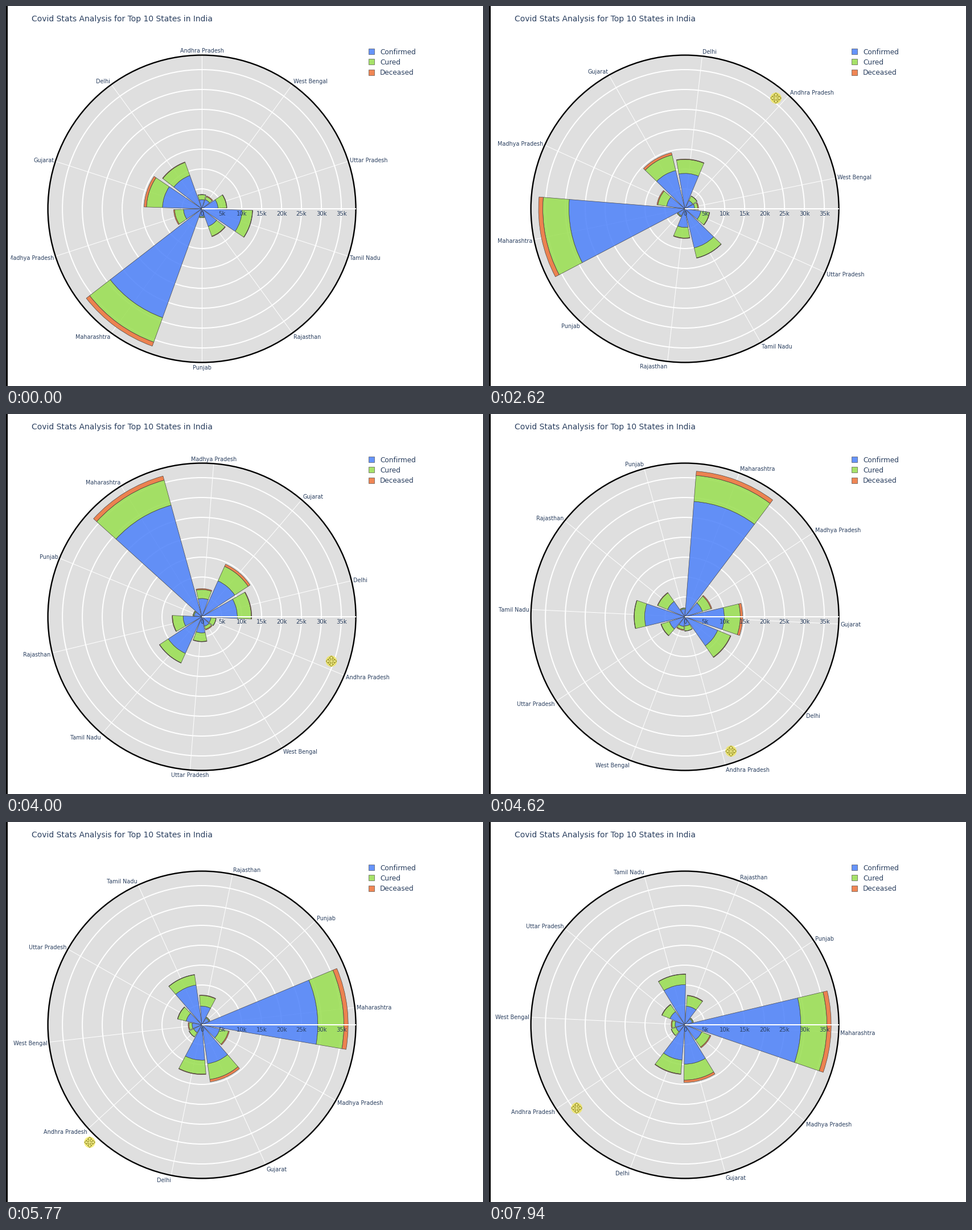
A matplotlib script that plays this animation: 838x669 px, repeating every 8 s.

```python
import numpy as np
import matplotlib.pyplot as plt
from matplotlib.animation import FuncAnimation
from matplotlib.patches import Circle, Polygon, Rectangle, Wedge

W, H, DPI = 838, 669, 64
PX = 72 / DPI
LOOP, TICK = 8000, 40
STEP = LOOP / 104          # the picture refreshes about 13 times a second
CX, CY, R = 344.1, H - 357, 270.5
RING = 35                  # pixels per 5k cases
INK = "#2a3f5f"
SERIES = [("Confirmed", "#5184fa"), ("Cured", "#9bdf54"), ("Deceased", "#ee753c")]

# thousands of cases, one entry per series
STATES = {
    "Andhra Pradesh": (2.3, 1.25, 0.05),
    "Delhi": (8.9, 3.5, 0.12),
    "Gujarat": (9.9, 4.0, 0.6),
    "Madhya Pradesh": (4.6, 2.25, 0.24),
    "Maharashtra": (29.1, 6.55, 1.07),
    "Punjab": (1.95, 0.26, 0.03),
    "Rajasthan": (4.7, 2.65, 0.12),
    "Tamil Nadu": (10.1, 2.6, 0.07),
    "Uttar Pradesh": (4.05, 2.15, 0.1),
    "West Bengal": (2.45, 0.8, 0.2),
}
SECTOR = 360 / len(STATES)
BAR = 0.9 * SECTOR

# the drag: time in ms, chart turn in degrees, cursor distance from the centre
ENTER, ARRIVE, GRAB = 70, 840, 1300
DRAG = np.array([
    (GRAB, 0, 275), (1930, 16.8, 283), (2620, 42.65, 252), (4000, 112.4, 240.5),
    (5160, 205.1, 265), (6090, 233, 294), (6460, 234.5, 298),
    (7560, 234.5, 298), (7920, 236.8, 240)])


def smooth(t, v):
    """Monotone cubic through key points, flat at both ends."""
    s = np.diff(v) / np.diff(t)
    m = np.zeros(len(v))
    for i, (a, b) in enumerate(zip(s, s[1:]), 1):
        m[i] = 2 * a * b / (a + b) if a * b > 0 else 0

    def value(x):
        x = np.clip(x, t[0], t[-1])
        i = min(np.searchsorted(t, x, "right") - 1, len(t) - 2)
        h = t[i + 1] - t[i]
        u = (x - t[i]) / h
        return ((1 + 2 * u) * (1 - u) ** 2 * v[i] + u * (1 - u) ** 2 * h * m[i]
                + u * u * (3 - 2 * u) * v[i + 1] + u * u * (u - 1) * h * m[i + 1])
    return value


turn = smooth(DRAG[:, 0], DRAG[:, 1])
reach = smooth(DRAG[:, 0], DRAG[:, 2])

fig = plt.figure(figsize=(W / DPI, H / DPI), dpi=DPI, facecolor="white")
ax = fig.add_axes([0, 0, 1, 1])
ax.set(xlim=(0, W), ylim=(0, H))
ax.axis("off")


def add(patch, z):
    patch.set_zorder(z)
    return ax.add_patch(patch)


def write(x, y, text, size, align="left"):
    """Text whose capitals are centred on height y, measured from the top."""
    return ax.text(x, H - y - 0.365 * size, text, size=size * PX, color=INK,
                   family="DejaVu Sans", ha=align, va="baseline", zorder=8)


def ring(radius, color, width, z):
    add(Circle((CX, CY), radius, fill=False, ec=color, lw=width * PX), z)


def polar(radius, degrees):
    a = np.radians(degrees)
    return np.array([CX + radius * np.cos(a), CY + radius * np.sin(a)])


add(Circle((CX, CY), R, fc="#dfdfdf", ec="none"), 1)
for k in range(1, 8):
    ring(RING * k, "white", 2, 2)
ring(R, "black", 2.4, 4)

spokes = [ax.plot([], [], color="white", lw=PX, zorder=2)[0] for _ in STATES]
labels = [write(0, 0, name, 9.6) for name in STATES]

bars = []
for i, counts in enumerate(STATES.values()):
    radii = np.cumsum(counts) * RING / 5
    for j, (top, count) in enumerate(zip(radii, counts)):
        bar = Wedge((CX, CY), top, 0, BAR, width=count * RING / 5, fc=SERIES[j][1],
                    ec="#3c3c3c", lw=0.7 * PX, alpha=0.88)
        bars.append((i, add(bar, 3 + 0.1 * j)))

ax.plot([CX, CX + R], [CY, CY], color="white", lw=2 * PX, zorder=5,
        solid_capstyle="butt")
for k in range(8):
    write(CX + RING * k, 365.5, f"{5 * k}k" if k else "0", 10.1, "center")

write(45, 22.3, "Covid Stats Analysis for Top 10 States in India", 13.9)
for k, (name, color) in enumerate(SERIES):
    y = 80.2 + 18.2 * k
    add(Rectangle((636.5, H - y - 5), 10, 10, fc=color, ec="#444444",
                  lw=0.7 * PX, alpha=0.88), 6)
    write(657, y, name, 12.1)

# left margin hides labels that run off the chart
add(Rectangle((0, 0), 8, H, fc="white", ec="none"), 9)
add(Rectangle((0, 0), 2.5, H, fc="black", ec="none"), 9)

arm = np.array([(1.3, 1.3), (1.3, 5), (4, 5), (0, 9.2), (-4, 5), (-1.3, 5)])
quarter = np.array([(0, 1), (-1, 0)])
cross = np.vstack([arm @ np.linalg.matrix_power(quarter, k) for k in range(4)])
halo = add(Circle((0, 0), 9.8, fc="#f2e63c", ec="none", alpha=0.65), 10)
arrows = add(Polygon(cross, closed=True, fc="#f3ee8c", ec="#8a8420", lw=0.9 * PX), 11)


def cursor(t):
    if t >= GRAB:
        lag = 2.4 + 0.26 * t / 1000
        return polar(reach(t), 90 - turn(t) + lag)
    u = np.clip((t - ENTER) / (ARRIVE - ENTER), 0, 1)
    u = u * u * (3 - 2 * u)
    start, bend, end = np.array([(600, H - 558), (130, H - 110), polar(275, 92.7)])
    return (1 - u) ** 2 * start + 2 * u * (1 - u) * bend + u * u * end


def draw(n):
    t = int((n * TICK + 30) / STEP) * STEP
    start = 90 - turn(t)
    for i, (spoke, label) in enumerate(zip(spokes, labels)):
        angle = start + SECTOR * i
        spoke.set_data(*zip((CX, CY), polar(R, angle)))
        c, s = np.cos(np.radians(angle)), np.sin(np.radians(angle))
        label.set_ha("center" if abs(c) < 0.1 else "left" if c > 0 else "right")
        label.set_position((CX + 273.3 * c, CY - 4.1 + 278.6 * s))
    for i, bar in bars:
        mid = start + SECTOR * i
        bar.set_theta1(mid - BAR / 2)
        bar.set_theta2(mid + BAR / 2)
    spot = cursor(t)
    halo.center = spot
    arrows.set_xy(cross + spot)
    for part in (halo, arrows):
        part.set_visible(t >= ENTER)
    return []


anim = FuncAnimation(fig, draw, frames=LOOP // TICK, interval=TICK,
                     init_func=lambda: draw(0), repeat=True, repeat_delay=0)
plt.show()
```
